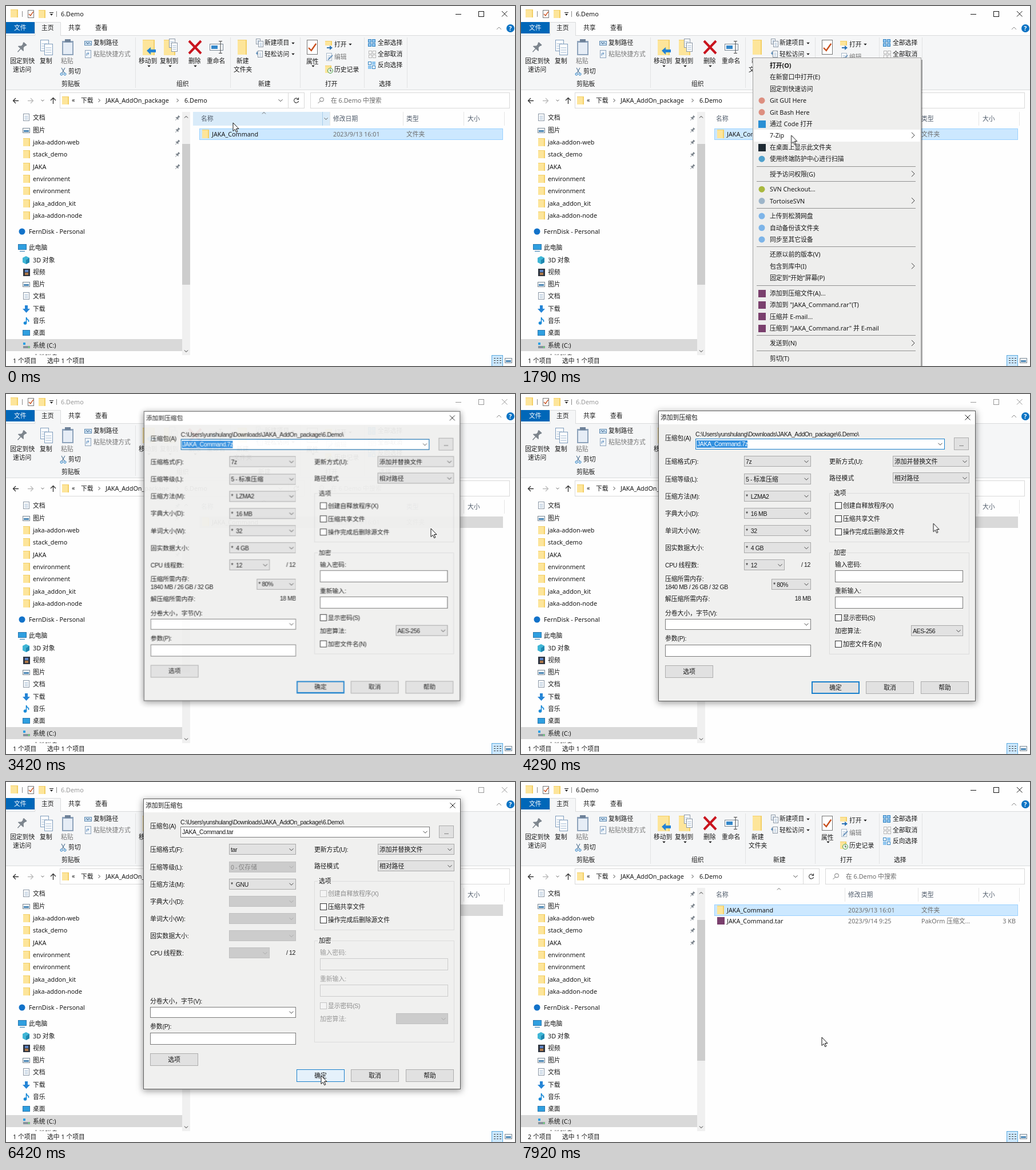
Recreate the animation shown at these times as an HTML page. Size 890 px wide and 629 px high, loop 8000 ms.

```html
<!DOCTYPE html>
<html lang="zh-CN">
<head>
<meta charset="utf-8">
<title>添加到压缩包</title>
<style>
html, body { margin: 0; width: 100%; height: 100%; overflow: hidden; background: #fefefe; }
svg { display: block; width: 100%; height: 100%; }
text { font: 10.8px "Noto Sans", "Noto Sans CJK SC", "Noto Sans CJK", sans-serif; white-space: pre; }
.bold { font-weight: 700; }
.latin { font: 10.5px "Liberation Sans", Arial, sans-serif; letter-spacing: -.4px; }
rect { shape-rendering: crispEdges; }
.shadow { filter: blur(6px); }

/* 1% of the loop is 80 ms */
.fade, .cue, #cursor { animation: 8s linear infinite; }
.cue { animation-timing-function: step-end; }
#cursor { animation-name: cursor; animation-timing-function: ease-in-out; }
#dialog { animation-name: dialog; transform-origin: 517.5px 283px; }
#menu { animation-name: menu; }
#submenu { animation-name: submenu; }
#header { animation-name: header; }
#active { animation-name: active; }
#inactive, #greyRow { animation-name: inactive; }
#oneItem { animation-name: before; }
#twoItems, #newRow { animation-name: after; }
#hover7z { animation-name: hover7z; }
#hoverAdd { animation-name: hoverAdd; }
#form7z { animation-name: form7z; }
#formTar { animation-name: formTar; }
#focus { animation-name: focus; }
#list { animation-name: list; }
#picked { animation-name: picked; }
#okHover { animation-name: okHover; }

@keyframes cursor {
  0%, 1% { transform: translate(397px, 204px); }
  9.5%, 18.7% { transform: translate(405px, 222px); }
  25%, 30.2% { transform: translate(510px, 228px); }
  34.8%, 52.6% { transform: translate(743px, 235px); }
  58%, 59.5% { transform: translate(452px, 117px); }
  62%, 67% { transform: translate(408px, 143px); }
  73.5% { transform: translate(492px, 420px); }
  79.5%, 84.8% { transform: translate(551px, 513px); }
  90%, 100% { transform: translate(526px, 446px); }
}
@keyframes dialog {
  0%, 40.6% { opacity: 0; transform: scale(.93); }
  42.75% { opacity: .95; transform: scale(.997); }
  43.8%, 82.2% { opacity: 1; transform: none; }
  83.8%, 100% { opacity: 0; transform: scale(.95); }
}
@keyframes menu {
  0%, 11.2% { opacity: 0; }
  12.5% { opacity: .84; }
  13.5%, 40% { opacity: 1; }
  41%, 100% { opacity: 0; }
}
@keyframes submenu {
  0%, 27% { opacity: 0; }
  28.5%, 40% { opacity: 1; }
  41%, 100% { opacity: 0; }
}
@keyframes header { 0%, 2.5% { opacity: 1; } 6%, 100% { opacity: 0; } }
@keyframes active { 0% { opacity: 1; } 41.1% { opacity: 0; } 83% { opacity: 1; } }
@keyframes inactive { 0% { opacity: 0; } 41.1% { opacity: 1; } 83% { opacity: 0; } }
@keyframes before { 0% { opacity: 1; } 94.75% { opacity: 0; } }
@keyframes after { 0% { opacity: 0; } 94.75% { opacity: 1; } }
@keyframes hover7z { 0% { opacity: 0; } 19.7% { opacity: 1; } }
@keyframes hoverAdd { 0% { opacity: 0; } 33.5% { opacity: 1; } }
@keyframes form7z { 0% { opacity: 1; } 65.1% { opacity: 0; } }
@keyframes formTar { 0% { opacity: 0; } 65.1% { opacity: 1; } }
@keyframes focus { 0% { opacity: 1; } 58.7% { opacity: 0; } }
@keyframes list { 0% { opacity: 0; } 58.9% { opacity: 1; } 63.4% { opacity: 0; } }
@keyframes picked { 0% { opacity: 0; } 63.4% { opacity: 1; } 65.1% { opacity: 0; } }
@keyframes okHover { 0% { opacity: 0; } 79% { opacity: 1; } }
</style>
</head>
<body>
<svg id="stage" viewBox="0 0 890 629"></svg>
<script>
const INK = '#181818', GREY = '#777', BLUE = '#0067b8', FOCUS = '#1a80cc', LINE = '#d9d9d9';

// y of text is its vertical centre
const text = (x, y, s, fill = INK, attrs = '') =>
  `<text x="${x}" y="${y + 4}" fill="${fill}" ${attrs}>${s}</text>`;
const rect = (x, y, w, h, fill, stroke, sw = 1) => stroke
  ? `<rect x="${x + sw / 2}" y="${y + sw / 2}" width="${w - sw}" height="${h - sw}" fill="${fill}" stroke="${stroke}" stroke-width="${sw}"/>`
  : `<rect x="${x}" y="${y}" width="${w}" height="${h}" fill="${fill}"/>`;
const path = (d, stroke = INK, fill = 'none', w = 1) =>
  `<path d="${d}" stroke="${stroke}" fill="${fill}" stroke-width="${w}"/>`;
const dot = (x, y, r, fill, stroke = 'none') =>
  `<circle cx="${x}" cy="${y}" r="${r}" fill="${fill}" stroke="${stroke}"/>`;
const group = (id, kind, ...parts) => `<g id="${id}" class="${kind}">${parts.join('')}</g>`;
const texts = (list, fill) => list.map(([x, y, s]) => text(x, y, s, fill)).join('');

const down = (x, y, c = '#444', s = 3.5) => path(`M${x - s} ${y - s / 2}l${s} ${s} ${s}-${s}`, c);
const up = (x, y, c = '#444', s = 3.5) => path(`M${x - s} ${y + s / 2}l${s}-${s} ${s} ${s}`, c);
const right = (x, y, c = '#444', s = 3) => path(`M${x - s / 2} ${y - s}l${s} ${s}-${s} ${s}`, c);
const caret = (x, y) => path(`M${x - 2.7} ${y - 1.3}h5.4l-2.7 3z`, 'none', INK);

const folder = (x, y, w = 12, h = 14) =>
  rect(x, y, w, h, '#f3cf66') + rect(x, y + 1, w - 2, h - 1, '#fde59a');
const page = (x, y, w = 11, h = 13, c = '#8a97a6') => rect(x, y, w, h, '#fff', c) +
  path(`M${x + 2.5} ${y + h * .35}h${w - 5}M${x + 2.5} ${y + h * .55}h${w - 5}M${x + 2.5} ${y + h * .75}h${w - 5}`, '#9ab4cf');
const check = (x, y, s, c = '#c8501e') => path(`M${x} ${y}l${s * .4} ${s * .4} ${s * .7}-${s}`, c, 'none', s / 5);
const pin = (x, y, k) => `<g transform="translate(${x} ${y}) rotate(42) scale(${k})">` +
  path('M-3-7h6v2l-1 1v3l3 3v1h-10v-1l3-3v-3l-1-1zM-.6 3h1.2v6h-1.2z', 'none', '#7d858d') + '</g>';
const picture = (x, y) => rect(x, y, 13, 9, '#eef4f8', '#7f8b95') + rect(x + 2, y + 4, 9, 3, '#4d87b5');
const screen = (x, y, w, h) => rect(x, y, w, h, '#2f9fe0', '#2a76ad');

function windowButtons(c) {
  return text(96, 14, '6.Demo', c) + path('M786 14.5h10', c) + rect(826, 9, 10, 10, 'none', c) +
    path('M867 9l9.5 9.5m0-9.5l-9.5 9.5', c);
}

function ribbon() {
  const tiles = (x, y, c, fill) => [0, 7].map(i => [0, 7].map(j =>
    rect(x + i, y + j, 6, 6, fill, c)).join('')).join('');
  return [
    folder(8, 6, 13, 14), path('M28.5 9v10M88.5 9v10', '#888'),
    rect(38, 7, 11, 14, '#fff', '#777'), check(40, 14, 7), folder(57, 7, 12, 14),
    path('M76 11.5h7', INK), caret(79.5, 15),
    rect(0, 51, 890, 96, '#f5f6f7'), path('M0 51.5H890M0 146.5H890', '#dadbdc'),
    rect(0, 28, 50, 20, BLUE), text(14, 38, '文件', '#fff'),
    path('M50.5 52V28.5H95.5V52', '#dadbdc', '#f5f6f7'),
    texts([[62, 38, '主页'], [109, 38, '共享'], [156, 38, '查看']]),
    up(862, 39, '#888', 4), dot(882, 39, 7, '#0b73c4'), text(879.2, 39, '?', '#fff', 'class="bold"'),
    [226, 392, 514, 626, 701].map(x => path(`M${x + .5} 55V143`, '#e2e3e4')).join(''),

    pin(28, 72, 1.25),
    page(60, 59, 15, 20, '#7e9cbc'), page(67, 66, 15, 20, '#7e9cbc'),
    rect(98, 61, 20, 25, '#8ea3bb'), rect(100, 64, 16, 20, '#e6edf6'), rect(103, 58, 10, 5, '#6f8299'),
    rect(137, 61, 13, 8, '#d4e7f7', '#5b87ae'), path('M139 65.5l2-2 2 3 2-3 3 3', '#24527d'),
    rect(138, 77, 11, 14, '#eef3f8', '#8fa6be'), path('M141 87v-4h4m-2-2l2 2-2 2', '#5f8fc0'),
    path('M97 108l5 9M103 108l-5 9', '#5c7b99', 'none', 1.2), dot(97, 119, 2, 'none', '#1a78c2'), dot(103, 119, 2, 'none', '#1a78c2'),
    folder(239, 59, 21, 27), path('M246 78l7-6v4h9v5h-9v4z', 'none', '#2383d5'),
    folder(276, 59, 20, 27), page(285, 57, 11, 16), page(289, 64, 11, 16),
    path('M320 61l21 22M341 61l-21 22', '#c9141e', 'none', 4),
    rect(356, 66, 24, 12, '#f8fbfd', '#7a8793'), rect(359, 69, 11, 6, '#3487c9'), path('M372 61.5h6m-3 0v21m-3 0h6', '#444'),
    folder(405, 59, 16, 26),
    page(437, 57, 8, 10), page(441, 61, 9, 11), path('M437 82.5h4m-2-3v6', '#2d6fa8'), page(440, 78, 9, 12),
    rect(526, 59, 19, 26, '#fff', '#777'), check(529, 73, 12),
    folder(558, 61, 12, 8), path('M561 72h5v-3l5 4-5 4v-3h-5z', 'none', '#2e74b5'),
    page(560, 82, 10, 14, '#a6b7c8'), path('M563 94l8-8', '#6f96bd', 'none', 2),
    folder(558, 104, 11, 13), dot(567, 113, 4.5, '#eaf6e6', '#4b9a4a'), path('M567 110.5v3h2', '#333'),
    tiles(633, 58, '#2f80c0', '#8fc6f0'), tiles(634, 78, '#b3b3b3', '#fff'),
    tiles(633, 97, '#2f80c0', '#fff'), rect(640, 97, 6, 6, '#8fc6f0'), rect(633, 104, 6, 6, '#8fc6f0'),

    texts([[7, 96, '固定到快'], [12, 111, '速访问'], [59, 96, '复制'], [153, 64, '复制路径'], [109, 114, '剪切'],
      [97, 136, '剪贴板'], [232, 96, '移动到'], [269, 96, '复制到'], [319, 96, '删除'], [351, 96, '重命名'],
      [298, 136, '组织'], [403, 96, '新建'], [398, 111, '文件夹'], [452, 64, '新建项目'], [452, 84, '轻松访问'],
      [441, 136, '新建'], [525, 97, '属性'], [574, 67, '打开'], [574, 111, '历史记录'], [558, 136, '打开'],
      [650, 64, '全部选择'], [650, 84, '全部取消'], [650, 103, '反向选择'], [652, 136, '选择']]),
    texts([[96, 96, '粘贴'], [153, 84, '粘贴快捷方式'], [574, 89, '编辑']], GREY),
    [[250, 105], [287, 105], [331, 105], [537, 105], [502, 65], [502, 84], [602, 67]].map(a => caret(...a)).join('')
  ].join('');
}

function addressBar() {
  return [
    path('M22 165.5H12.5m4.5-4.5l-4.5 4.5 4.5 4.5', '#333', 'none', 1.3),
    path('M38 165.5h9.5m-4.5-4.5l4.5 4.5-4.5 4.5', '#bbb', 'none', 1.3),
    down(64, 165, '#666', 2.5), path('M82.5 171V160.5m-4.5 4.5l4.5-4.5 4.5 4.5', '#333', 'none', 1.3),
    rect(94, 151, 428, 28, '#fff', LINE), path('M493.5 152v26', LINE), folder(98, 158),
    text(115, 164, '«'), text(131, 165, '下载'), right(163, 165), text(174, 165, 'JAKA_AddOn_package'),
    right(300, 165), text(312, 165, '6.Demo'), down(480, 165),
    path('M511 163a4 4 0 1 0 .5 3M511.5 160v3.5h-3.5', '#444', 'none', 1.2),
    rect(532, 151, 349, 28, '#fff', LINE), dot(552, 163.5, 3.5, 'none', '#777'), path('M549.5 166l-4 4', '#777'),
    text(568, 165, '在 6.Demo 中搜索', '#6a6a6a')
  ].join('');
}

function navPane() {
  const doc = y => page(30, y - 7, 11, 13), pic = y => picture(29, y - 4), dir = y => folder(30, y - 7);
  const quick = [['文档', doc], ['图片', pic], ['jaka-addon-web', dir], ['stack_demo', dir], ['JAKA', dir],
    ['environment', dir], ['environment', dir], ['jaka_addon_kit', dir], ['jaka-addon-node', dir]];
  const computer = [
    ['3D 对象', y => path(`M29 ${y - 4}l6-3 6 3v8l-6 3-6-3z`, 'none', '#3fb6d6') + path(`M35 ${y}v7l6-3v-8z`, 'none', '#1f87b0')],
    ['视频', y => rect(30, y - 6, 12, 13, '#2f3540') + rect(33, y - 4, 6, 4, '#5e86c8') + rect(33, y + 1, 6, 4, '#b07a4a')],
    ['图片', pic], ['文档', doc],
    ['下载', y => path(`M33 ${y - 6}h5v6h4l-6.5 7-6.5-7h4z`, 'none', '#2585d6')],
    ['音乐', y => path(`M35.5 ${y + 4}v-10q1 4 4 5v3`, '#1a8ad8', 'none', 1.6) + dot(33.5, y + 4, 2.8, '#1a8ad8')],
    ['桌面', y => screen(29, y - 5, 13, 10)],
    ['系统 (C:)', y => rect(30, y - 5, 4, 4, '#27a0e6') + rect(30, y + 1, 12, 4, '#87929c') + rect(39, y + 2, 2, 2, '#6f6')],
    ['本地磁盘 (D:)', y => rect(30, y + 1, 12, 4, '#87929c')]];
  const rows = (list, top) => list.map(([name, icon], i) => {
    const y = top + i * 21.3;
    return icon(Math.round(y)) + text(47, y, name);
  }).join('');
  return [
    rect(0, 582, 308, 21, '#d9d9d9'), rows(quick, 195.4), rows(computer, 443.5),
    [0, 1, 2, 3, 4].map(i => pin(300, 195.5 + i * 21.3, .62)).join(''),
    dot(28, 394, 5.5, '#1272c9'), text(40, 394, 'FernDisk - Personal'),
    screen(21, 416, 15, 10), path('M24 428.5h9', '#2a76ad'), text(40, 422, '此电脑'),
    rect(308, 185, 14, 425, '#f0f0f0'), rect(308, 241, 14, 246, '#cdcdcd'), up(315, 194, '#333', 3), down(315, 603, '#333', 3),
    rect(0, 610, 890, 19, '#fefefe')
  ].join('');
}

function fileList() {
  return [
    group('header', 'fade', rect(327, 185, 240, 24, '#d9ebf9'), path('M553.5 185v24', '#a8cdea'), down(559.5, 197, '#555', 3)),
    up(451, 187, '#666', 3), [566, 694, 800, 871].map(x => path(`M${x + .5} 185v24`, '#e5e5e5')).join(''),
    texts([[341, 197, '名称'], [572, 197, '修改日期'], [700, 197, '类型'], [807, 197, '大小']], '#4f5b6a'),
    rect(338, 214, 531, 20, '#cce8ff', '#99d1ff'), group('greyRow', 'cue', rect(338, 214, 531, 20, '#d9d9d9')),
    folder(343, 216, 12, 15), text(360, 224, 'JAKA_Command'),
    texts([[572, 224, '2023/9/13 16:01'], [700, 224, '文件夹']], '#6d6d6d'),
    group('newRow', 'cue', rect(343, 236, 13, 13, '#7a3f6d'), text(360, 243, 'JAKA_Command.tar'),
      texts([[572, 243, '2023/9/14 9:25'], [700, 243, 'PakOrm 压缩文...']], '#6d6d6d'),
      text(865, 243, '3 KB', '#6d6d6d', 'text-anchor="end"')),
    group('oneItem', 'cue', text(12, 620, '1 个项目')), group('twoItems', 'cue', text(12, 620, '2 个项目')),
    text(72, 620, '选中 1 个项目'),
    rect(849, 610, 20, 20, '#cce8ff', '#5aa9dd'),
    [0, 1, 2].map(i => path(`M853 ${615.5 + i * 4}h3m2 0h3m2 0h3`, '#444')).join(''), picture(872, 615)
  ].join('');
}

function contextMenu() {
  const round = c => y => dot(421, y, 5.5, c), square = c => y => rect(415, Math.round(y) - 6, 13, 13, c);
  const git = round('#dd8f80'), sync = round('#7db4e8'), rar = square('#7a3f6d');
  const items = [['打开(O)'], ['在新窗口中打开(E)'], ['固定到快速访问'], ['Git GUI Here', git], ['Git Bash Here', git],
    ['通过 Code 打开', square('#2a8fd4')], ['7-Zip', 0, 1], ['在桌面上显示此文件夹', square('#1e2a33')],
    ['使用终端防护中心进行扫描', round('#4fa0cc')], 0, ['授予访问权限(G)', 0, 1], 0,
    ['SVN Checkout...', round('#a9b83e')], ['TortoiseSVN', round('#9db5c9'), 1], 0,
    ['上传到松漪网盘', sync], ['自动备份该文件夹', sync], ['同步至其它设备', sync], 0,
    ['还原以前的版本(V)'], ['包含到库中(I)', 0, 1], ['固定到“开始”屏幕(P)'], 0,
    ['添加到压缩文件(A)...', rar], ['添加到 "JAKA_Command.rar"(T)', rar], ['压缩并 E-mail...', rar],
    ['压缩到 "JAKA_Command.rar" 并 E-mail', rar], 0, ['发送到(N)', 0, 1], 0, ['剪切(T)']];
  let y = 104, rows = '';
  items.forEach((item, i) => {
    if (!item) {
      rows += path(`M412 ${Math.round(y - 8) + .5}H690`, '#919191');
      y += 6.1;
      return;
    }
    const [label, icon, more] = item;
    rows += (icon ? icon(y) : '') + text(435, y, label, INK, i ? '' : 'class="bold"') +
      (more ? right(685.5, y - .5, '#333', 5) : '');
    y += 20.4;
  });
  const sub = ['添加到压缩包...', '压缩并邮寄...', '添加到 "JAKA_Command.7z"', '压缩 "JAKA_Command.7z" 并邮寄...',
    '添加到 "JAKA_Command.zip"', '压缩 "JAKA_Command.zip" 并邮寄...', 'CRC SHA'];
  return group('menu', 'fade', rect(408, 94, 294, 540, '#0005'), rect(405, 90, 295, 545, '#eeeeed', '#a0a0a0'),
      group('hover7z', 'cue', rect(407, 216, 291, 21, '#fff')), rows) +
    group('submenu', 'fade', rect(698, 218, 200, 149, '#0005'), rect(695, 214, 200, 151, '#eeeeed', '#a0a0a0'),
      group('hoverAdd', 'cue', rect(697, 217, 200, 21, '#fff')),
      sub.map((s, i) => text(725, 228 + i * 20.4, s)).join(''));
}

// Dialog text sets its Latin runs in a tighter sans
const label = (x, y, s, fill = INK, attrs = '') =>
  text(x, y, s.replace(/[ -~]+/g, '<tspan class="latin">$&</tspan>'), fill, attrs);
const labels = (list, fill) => list.map(([x, y, s]) => label(x, y, s, fill)).join('');
const combo = (x, y, w, s = '', off = false, fill = off ? '#ccc' : '#e2e2e2', line = off ? '#c0c0c0' : '#a9a9a9') =>
  rect(x, Math.floor(y - 9.5), w, 19, fill, line) + label(x + 3, y, s, off ? '#858585' : INK) +
  down(x + w - 8, y, off ? '#aaa' : '#444');
const box = (x, y, s, off) => rect(x, y - 6, 12, 12, off ? '#f4f4f4' : '#fff', off ? '#c4c4c4' : '#333') +
  label(x + 14, y, s, off ? '#8a8a8a' : INK);
const button = (x, y, w, s, line = '#adadad', sw = 1, fill = '#e1e1e1') => rect(x, y, w, 22, fill, line, sw) +
  label(x + w / 2, y + 10.5, s, INK, 'text-anchor="middle"');
const frame = (y, h, s) => rect(539, y, 245, h, 'none', '#dcdcdc') + rect(545, y - 4, 25, 9, '#f0f0ef') + label(547, y, s);

function form(tar) {
  const ink = tar ? '#9a9a9a' : INK;
  const field = y => rect(549, y, 224, 21, tar ? '#f0f0ef' : '#fff', tar ? '#ccc' : '#7a7a7a');
  return [
    label(308, 87, 'JAKA_Command.' + (tar ? 'tar' : '7z')),
    combo(390, 118, 117, tar ? 'tar' : '7z'),
    combo(390, 148.5, 117, tar ? '0 - 仅存储' : '5 - 标准压缩', tar),
    combo(390, 178.5, 117, tar ? '*  GNU' : '*  LZMA2'),
    ['*  16 MB', '*  32', '*  4 GB'].map((s, i) => combo(390, 208.8 + i * 30.1, 117, tar ? '' : s, tar)).join(''),
    combo(390, 299, 71, tar ? '' : '*  12', tar),
    box(549, 195, '创建自释放程序(X)', tar),
    labels([[549, 298, '输入密码:'], [549, 344, '重新输入:'], [549, 414, '加密算法:']], ink),
    field(308), field(354), box(549, 391, '显示密码(S)', tar),
    combo(682, 414, 91, tar ? '' : 'AES-256', tar),
    tar ? '' : labels([[252, 323, '压缩所需内存:'], [252, 337, '1840 MB / 26 GB / 32 GB'], [252, 358, '解压缩所需内存:']]) +
      label(507, 357, '18 MB', INK, 'text-anchor="end"') + combo(438, 332.5, 69, '* 80%') + box(549, 437, '加密文件名(N)')
  ].join('');
}

function dialog() {
  return group('dialog', 'fade',
    `<g class="shadow">${rect(239, 31, 557, 509, '#0006')}</g>`,
    rect(240, 29, 555, 508, '#f0f0ef', '#5c5c5c'), rect(241, 30, 553, 23, '#fff'),
    label(244, 41, '添加到压缩包'), path('M776.5 36.5l9 9m0-9l-9 9', INK),
    labels([[252, 77, '压缩包(A)'], [305, 70, 'C:\\Users\\yunshulang\\Downloads\\JAKA_AddOn_package\\6.Demo\\'],
      [252, 118, '压缩格式(F):'], [252, 148.5, '压缩等级(L):'], [252, 178.5, '压缩方法(M):'], [252, 208.5, '字典大小(D):'],
      [252, 239, '单词大小(W):'], [252, 269, '固实数据大小:'], [252, 299, 'CPU 线程数:'], [490, 298, '/ 12'],
      [252, 383, '分卷大小，字节(V):'], [252, 427, '参数(P):'], [539, 118, '更新方式(U):'], [539, 147, '路径模式']]),
    rect(305, 78, 436, 19, '#fff', '#7a7a7a'), down(733, 87.5),
    button(757, 76, 26, '...'),
    combo(252, 402.5, 255, '', false, '#fff', '#7a7a7a'), rect(252, 438, 255, 21, '#fff', '#7a7a7a'),
    combo(650, 118, 134, '添加并替换文件'), combo(650, 147, 134, '相对路径'),
    frame(173, 86, '选项'), frame(277, 178, '加密'),
    box(549, 218, '压缩共享文件'), box(549, 241, '操作完成后删除源文件'),
    button(252, 474, 84, '选项'), button(508, 502, 84, '确定', FOCUS, 2),
    button(603, 502, 84, '取消'), button(699, 502, 84, '帮助'),
    group('form7z', 'cue', form(false)), group('formTar', 'cue', form(true)),
    group('focus', 'cue', rect(305, 78, 436, 19, 'none', FOCUS), rect(307, 81, 89, 13, '#3390df'),
      label(308, 87, 'JAKA_Command.7z', '#fff')),
    group('list', 'cue', combo(390, 118, 117, '7z', false, '#cce4f7', FOCUS),
      rect(393, 131, 117, 44, '#0003'), rect(390, 127, 117, 46, '#fff', '#888'), rect(391, 139, 115, 11, '#0078d7'),
      ['7z', 'tar', 'wim', 'zip'].map((s, i) => label(393, 133 + i * 11, s, i === 1 ? '#fff' : INK)).join('')),
    group('picked', 'cue', rect(392, 160, 118, 16, '#0004'), rect(507, 133, 3, 27, '#0004'),
      combo(390, 148.5, 117, '0 - 仅存储'), rect(390, 158, 118, 15, '#e9e9e8'),
      combo(390, 118, 117, 'tar', false, '#cce4f7', FOCUS)),
    group('okHover', 'cue', button(508, 502, 84, '确定', FOCUS, 1, '#e5f1fb')));
}

document.getElementById('stage').innerHTML = [
  rect(0, 0, 890, 629, '#fefefe'), ribbon(),
  group('active', 'cue', windowButtons(INK)), group('inactive', 'cue', windowButtons('#999')),
  addressBar(), navPane(), fileList(), contextMenu(), dialog(),
  group('cursor', '', path('M0 0V14.5L3.4 11.4 5.7 16.6 7.9 15.6 5.6 10.5H10Z', '#111', '#fff'))
].join('');
</script>
</body>
</html>
```
